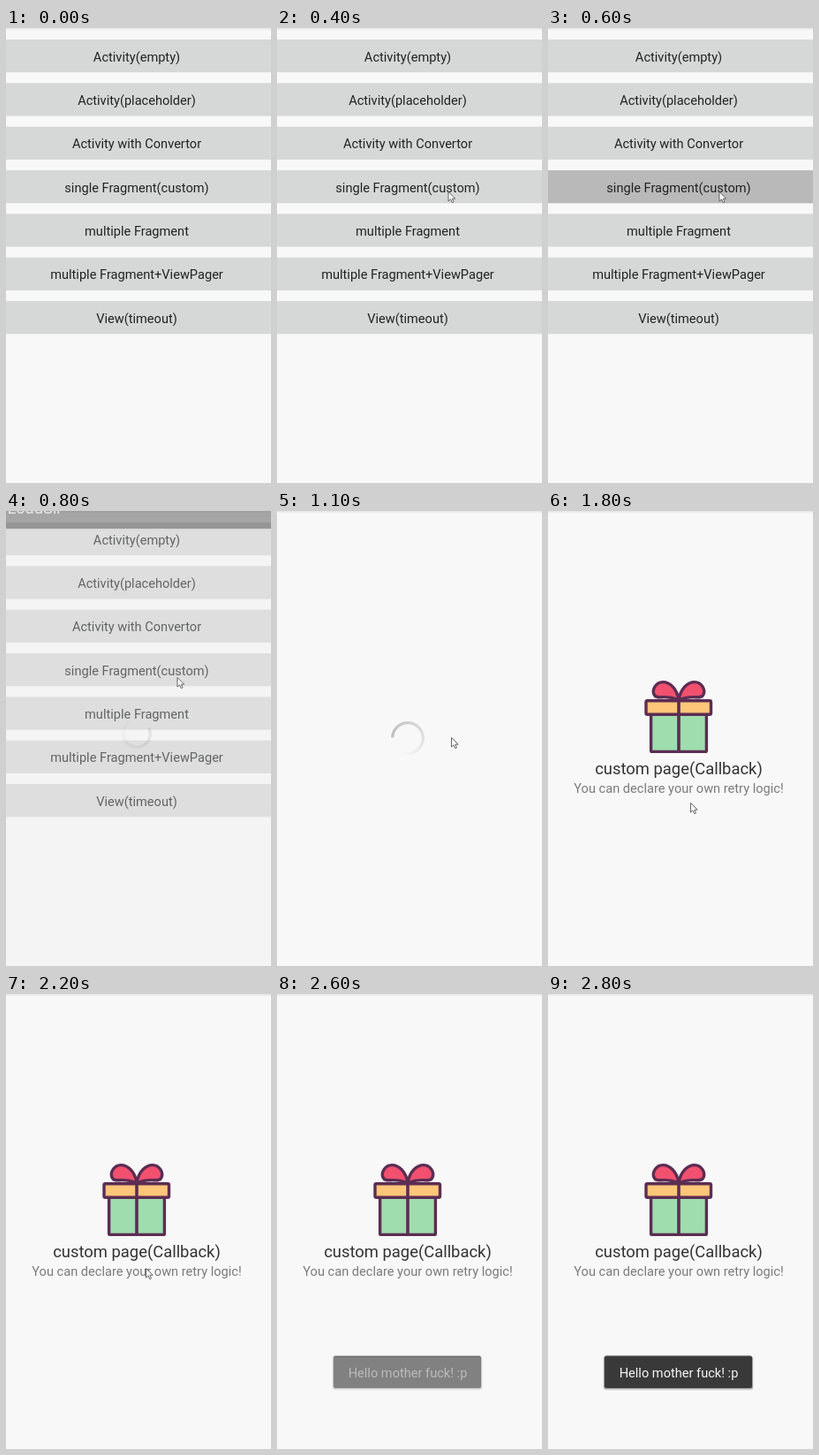
Recreate the animation shown at these times as an HTML page with a canvas. Size 300 by 515 pixels, loop 3500 ms.

```html
<!DOCTYPE html>
<html lang="en">
<head>
<meta charset="utf-8">
<title>Loading page demo</title>
<style>
  html, body { margin: 0; width: 100%; height: 100%; overflow: hidden; background: #f8f8f8; }
  canvas { display: block; width: 300px; height: 515px; }
</style>
</head>
<body>
<canvas id="stage"></canvas>
<script>
const W = 300, H = 515, LOOP = 3500, STEP = 100, MID = 148;
const PAGE = '#f8f8f8', BUTTON = '#d6d8d7', OUTLINE = '#5c2d53';
const LABELS = [
  'Activity(empty)', 'Activity(placeholder)', 'Activity with Convertor',
  'single Fragment(custom)', 'multiple Fragment',
  'multiple Fragment+ViewPager', 'View(timeout)'
];
// time, x, y of the pointer tip
const POINTER = [
  [100, 258, 136], [200, 232, 155], [300, 207, 174], [400, 193.5, 185],
  [700, 193.5, 185], [800, 193.5, 188], [900, 194, 196], [1000, 195.5, 224],
  [1100, 197, 256], [1500, 176, 319], [1600, 168, 330], [1700, 163, 335],
  [1800, 161, 330], [1900, 159, 318], [2000, 158, 310], [2500, 158, 310]
];

const canvas = document.getElementById('stage');
const ctx = canvas.getContext('2d');
const dpr = window.devicePixelRatio || 1;
canvas.width = Math.round(W * dpr);
canvas.height = Math.round(H * dpr);
ctx.scale(dpr, dpr);

const clamp = v => Math.max(0, Math.min(1, v));

function rect(x, y, w, h, fill) {
  ctx.fillStyle = fill;
  ctx.fillRect(x, y, w, h);
}

function text(str, x, y, size, fill, align = 'center') {
  ctx.font = `${size}px Roboto, sans-serif`;
  ctx.textAlign = align;
  ctx.fillStyle = fill;
  ctx.fillText(str, x, y);
}

function box(x, y, w, h, r, fill) {
  ctx.beginPath();
  ctx.roundRect(x, y, w, h, r);
  ctx.fillStyle = fill;
  ctx.fill();
}

function barShadow(y) {
  const g = ctx.createLinearGradient(0, y, 0, y + 3);
  g.addColorStop(0, 'rgba(0,0,0,.08)');
  g.addColorStop(1, 'rgba(0,0,0,0)');
  rect(0, y, W, 3, g);
}

function drawList(pressed) {
  rect(0, 0, W, H, PAGE);
  barShadow(0);
  LABELS.forEach((label, i) => {
    const y = 13 + i * 49.35;
    rect(0, y, W, 37.2, BUTTON);
    if (i === 3 && pressed) rect(0, y, W, 37.2, `rgba(185,185,185,${pressed})`);
    text(label, MID, y + 24.7, 14.6, '#222');
  });
}

function drawSpinner(t, shift) {
  const y = 257 - shift * .25, r = 17.3 - shift * .1;
  const head = (182 + (t - 1100) * .69) * Math.PI / 180;
  const sweep = Math.PI * 1.6, parts = 72;
  ctx.lineWidth = 3.2;
  for (let i = 0; i < parts; i++) {
    const a = head + sweep * i / parts;
    ctx.strokeStyle = `rgba(90,90,90,${.38 * (1 - i / parts)})`;
    ctx.beginPath();
    ctx.arc(MID, y, r, a, a + sweep / parts);
    ctx.stroke();
  }
}

function drawLoading(t) {
  const age = t - 745;
  const shift = 47 * Math.pow(1 - clamp(age / 350), 5);
  const alpha = age < 100 ? .33 : clamp(age / 190);
  ctx.globalAlpha = alpha;
  rect(0, 0, W, H, alpha < .5 ? '#e9e9e9' : PAGE);
  if (shift > .5) {
    rect(0, 0, W, shift, '#050505');
    text('LoadSir', 1.5, shift - 16.5, 18.3, '#fff', 'left');
    // the title stays bright while the bar is still translucent
    if (alpha < .5) {
      ctx.globalAlpha = .6;
      text('LoadSir', 1.5, shift - 16.5, 18.3, '#fff', 'left');
      ctx.globalAlpha = alpha;
    }
  }
  barShadow(shift);
  drawSpinner(t, shift);
  ctx.globalAlpha = 1;
}

function bowLoop(side) {
  ctx.save();
  ctx.translate(MID, 0);
  ctx.scale(side, 1);
  ctx.beginPath();
  ctx.moveTo(0, 214);
  ctx.bezierCurveTo(2, 201, 10, 193.6, 18, 193.6);
  ctx.bezierCurveTo(26, 193.6, 31, 203, 27.5, 208.5);
  ctx.bezierCurveTo(24, 214, 16, 207, 0, 214);
  ctx.closePath();
  ctx.fillStyle = '#f2506f';
  ctx.fill();
  ctx.stroke();
  ctx.restore();
}

function drawGift() {
  ctx.strokeStyle = OUTLINE;
  ctx.lineWidth = 3.4;
  ctx.lineJoin = 'round';
  bowLoop(-1);
  bowLoop(1);
  box(116.6, 230, 62.8, 42.4, 1.5, '#9fdcae');
  ctx.stroke();
  box(111, 214.7, 73.5, 15.6, 1.5, '#fdc679');
  ctx.stroke();
  rect(MID - 1.8, 214, 3.6, 58, OUTLINE);
}

function drawCustom() {
  rect(0, 0, W, H, PAGE);
  barShadow(0);
  drawGift();
  text('custom page(Callback)', MID, 298, 18.4, '#333');
  text('You can declare your own retry logic!', MID, 319, 14.6, '#7b7b7b');
}

function drawToast(alpha) {
  ctx.globalAlpha = alpha;
  box(62.5, 410, 170, 38.5, 3, 'rgba(0,0,0,.13)');
  box(63, 410, 169, 37.3, 3, 'rgba(0,0,0,.25)');
  box(64, 409.5, 167, 36.5, 2, '#393939');
  rect(65, 409.8, 165, 1, '#4a4a4a');
  text('Hello mother fuck! :p', MID, 434, 14.6, '#f6f6f6');
  ctx.globalAlpha = 1;
}

function drawPointer(t) {
  const i = POINTER.findIndex(p => p[0] > t);
  if (i < 1) return;
  const [t0, x0, y0] = POINTER[i - 1], [t1, x1, y1] = POINTER[i];
  const k = (t - t0) / (t1 - t0);
  ctx.save();
  ctx.translate(x0 + (x1 - x0) * k + .5, y0 + (y1 - y0) * k + .5);
  ctx.beginPath();
  [[0, 0], [0, 10.6], [2.5, 8.3], [4.3, 12.2], [6, 11.4], [4.3, 7.7], [7.7, 7.7]]
    .forEach(([x, y]) => ctx.lineTo(x, y));
  ctx.closePath();
  ctx.fillStyle = '#fff';
  ctx.fill();
  ctx.strokeStyle = '#555';
  ctx.lineWidth = .9;
  ctx.lineJoin = 'miter';
  ctx.stroke();
  ctx.restore();
}

function draw(now) {
  const t = Math.floor(now % LOOP / STEP) * STEP;
  if (t < 1700) {
    drawList(t === 600 ? 1 : t === 700 ? .6 : 0);
    if (t >= 800) drawLoading(t);
  } else {
    drawCustom();
    if (t >= 2500) drawToast(clamp((t - 2400) / 400));
  }
  drawPointer(t);
}

const start = performance.now();
function tick() {
  draw(performance.now() - start);
  requestAnimationFrame(tick);
}
tick();
</script>
</body>
</html>
```
